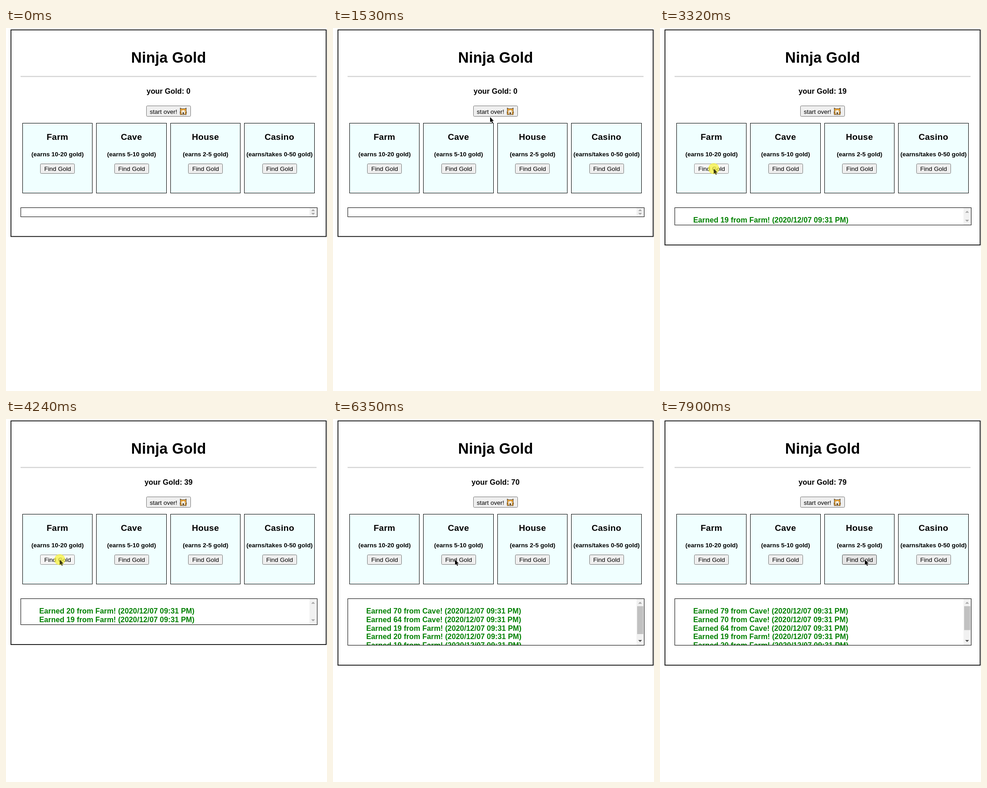
These frames come from a looping animation (705x795 px, 8000 ms). An HTML page:

```html
<!DOCTYPE html>
<html lang="en">
<head>
<meta charset="utf-8">
<title>Ninja Gold</title>
<style>
  html, body { margin: 0; width: 100%; height: 100%; overflow: hidden; background: #fff; }
  svg { display: block; width: 705px; height: 795px; font-family: "Liberation Sans", Arial, sans-serif; }
  text { white-space: pre; }
  .mid { text-anchor: middle; }
  .bold { font-weight: bold; }
  .title { font-size: 32.4px; letter-spacing: .28px; }
  .gold { font-size: 16.22px; letter-spacing: .08px; }
  .name { font-size: 19px; letter-spacing: .3px; }
  .note { font-size: 13.45px; }
  .label { font-size: 13.52px; letter-spacing: .03px; }
  .log { font-size: 16.22px; letter-spacing: .06px; fill: #008000; }
  .line { fill: none; stroke: #000; shape-rendering: crispEdges; }
  .card { fill: #f0ffff; stroke: #000; shape-rendering: crispEdges; }
  .btn { fill: #efefef; stroke: #767676; }
  .btn.hover { fill: #e5e5e5; stroke: #4f4f4f; }
  .btn.active { fill: #f5f5f5; stroke: #8d8d8d; }
</style>
</head>
<body>
<svg viewBox="0 0 705 795">
  <defs><clipPath id="clip"><rect id="clipBox" x="32" y="393" width="635" height="20"/></clipPath></defs>

  <rect id="frame" x="10.85" y="4.2" width="692.3" height="452" fill="none" stroke="#000" stroke-width="1.7"/>
  <text class="mid bold title" x="357.2" y="76.4">Ninja Gold</text>
  <rect x="32" y="105.5" width="650" height="1" fill="#a0a0a0"/>
  <rect x="32" y="106.5" width="650" height="1" fill="#e4e4e4"/>
  <text class="mid bold gold" id="total" x="357" y="144">your Gold: 0</text>

  <rect class="btn" x="308.5" y="170.5" width="97" height="23" rx="2"/>
  <text class="label" x="315.7" y="188">start over!</text>
  <g transform="translate(381 174)" stroke-linejoin="round">
    <path d="M2.2 7L1.6 1.2L5.6 3.2Q8.3 2.4 11 3.2L15 1.2L14.4 7Q16.4 11 14.4 14Q8.3 18 2.2 14Q.2 11 2.2 7Z" fill="#f7a932" stroke="#3a2a14"/>
    <path d="M8.3 5L12.6 9.6L12.8 14Q8.3 16.6 3.8 14L4 9.6Z" fill="#fff3df"/>
    <circle cx="5.4" cy="7.8" r="1.5" fill="#fff"/><circle cx="11.2" cy="7.8" r="1.5" fill="#fff"/>
    <circle cx="5.5" cy="7.9" r=".7" fill="#222"/><circle cx="11.1" cy="7.9" r=".7" fill="#222"/>
    <ellipse cx="8.3" cy="12.6" rx="1.7" ry="2.2" fill="#3a2a14"/>
    <path d="M1.2 11.5L4 11.2L4.4 16H1.8ZM15.4 11.5L12.6 11.2L12.2 16H14.8Z" fill="#f7a932" stroke="#3a2a14" stroke-width=".7"/>
  </g>

  <g id="cards"></g>

  <g clip-path="url(#clip)" id="lines"></g>
  <rect id="track" x="666.5" y="393" width="17" height="20" fill="#f1f1f1"/>
  <rect id="thumb" x="668" y="410" width="13.5" height="0" fill="#c1c1c1"/>
  <path id="up" d="M-4.2 2.1L0 -2.1L4.2 2.1Z" fill="#a3a3a3"/>
  <path id="down" d="M-4.2 -2.1L0 2.1L4.2 -2.1Z" fill="#a3a3a3"/>
  <rect id="logBox" class="line" x="32.4" y="393" width="651.1" height="20"/>

  <circle id="spot" r="12" fill="#f8f43a" fill-opacity=".72"/>
  <path id="cursor" d="M0 0V11.5L2.7 9.2L4.6 13.6L6.5 12.8L4.6 8.6H8.2Z" stroke="#fff" stroke-width=".8" paint-order="stroke"/>
</svg>
<script>
const LOOP = 8000, LINE = 18.65, LOG_TOP = 393, LOG_MAX = 495.6;
const $ = id => document.getElementById(id);
const set = (el, attrs) => { for (const k in attrs) el.setAttribute(k, attrs[k]); };

const places = [["Farm", "earns 10-20"], ["Cave", "earns 5-10"], ["House", "earns 2-5"], ["Casino", "earns/takes 0-50"]];
$("cards").innerHTML = places.map(([name, note], i) => {
  const x = 113 + 162.5 * i;
  return `<rect class="card" x="${x - 76.7}" y="208.4" width="153.6" height="153.2"/>
    <text class="mid bold name" x="${x}" y="244.8">${name}</text>
    <text class="mid bold note" x="${x + .3}" y="281">(${note} gold)</text>
    <rect class="btn" x="${Math.floor(x - 37.5) + .5}" y="297.5" width="75" height="21" rx="2"/>
    <text class="mid label" x="${x + .4}" y="313">Find Gold</text>`;
}).join("");
$("lines").innerHTML = [0, 1, 2, 3, 4, 5].map(i =>
  `<text class="bold log" x="72.9" y="${426.4 + LINE * i}"></text>`).join("");
const rows = [...$("lines").children];
const buttons = [...document.querySelectorAll(".btn")].map(el => ({
  el, x: +el.getAttribute("x"), y: +el.getAttribute("y"),
  w: +el.getAttribute("width"), h: +el.getAttribute("height")
}));

// press, release, page update, amount, place, total
const clicks = [
  [830, 970, 970],
  [1681, 1760, 1760],
  [2400, 2480, 2550, 19, "Farm", 19],
  [3320, 3400, 3480, 20, "Farm", 39],
  [4240, 4320, 4400, 19, "Farm", 58],
  [5320, 5400, 5500, 64, "Cave", 64],
  [6180, 6260, 6350, 70, "Cave", 70],
  [7120, 7200, 7290, 79, "Cave", 79]
];

// start, step length, steps, then [step, x, y] stops
const moves = [
  [110, 80, 10, [0, 652, 784], [3, 545, 420], [5, 430, 264], [7, 350, 420], [8, 333, 512], [9, 333, 512]],
  [970, 79, 11, [0, 333, 512], [3, 260, 410], [5, 300, 270], [7, 345, 195], [8, 346, 180], [10, 346, 180]],
  [1850, 76, 6, [0, 334, 187], [2, 240, 242], [4, 132, 303], [5, 118, 308]],
  [4630, 78.3, 7, [0, 122, 308], [2, 172, 306], [4, 238, 306], [6, 268, 308]],
  [7500, 80, 6, [0, 280, 308], [2, 358, 307], [4, 438, 308], [5, 450, 308]]
];

function pointer(t) {
  const move = moves.filter(m => t >= m[0]).pop();
  if (!move) return null;
  const [start, step, count, ...stops] = move;
  const k = Math.min(count - 1, Math.floor((t - start) / step));
  const i = Math.max(1, stops.findIndex(s => s[0] >= k));
  const a = stops[i - 1], b = stops[i], u = (k - a[0]) / (b[0] - a[0]);
  return { x: a[1] + (b[1] - a[1]) * u, y: a[2] + (b[2] - a[2]) * u, start };
}

function drawLog(t) {
  const done = clicks.filter(c => c[3] && t >= c[2]).reverse();
  const n = done.length;
  const bottom = Math.min(LOG_TOP + 20 + LINE * n, LOG_MAX);
  const height = bottom - LOG_TOP;
  rows.forEach((row, i) => {
    const c = done[i];
    row.textContent = c ? `Earned ${c[3]} from ${c[4]}! (2020/12/07 09:31 PM)` : "";
  });
  $("total").textContent = "your Gold: " + (n ? done[0][5] : 0);
  for (const id of ["logBox", "clipBox", "track"]) set($(id), { height });
  set($("frame"), { height: bottom + 43.6 - 4.2 });

  const inset = n ? 9.5 : 6;
  const scrolls = n > 4;
  set($("up"), { transform: `translate(674.5 ${LOG_TOP + inset})` });
  set($("down"), { transform: `translate(674.5 ${bottom - inset})`, fill: scrolls ? "#505050" : "#a3a3a3" });
  set($("thumb"), { height: scrolls ? 67.5 * 101.4 / (19 + LINE * n) : 0 });
}

function draw(t) {
  const p = pointer(t);
  const pressed = clicks.some(c => t >= c[0] && t < c[1]);
  // a reloaded page shows no hover until the pointer moves again
  const last = clicks.filter(c => c[3] && t >= c[2]).pop();
  const pressing = clicks.some(c => t >= c[0] && t < c[2]);
  const stale = p && last && last[2] > p.start && !pressing;

  for (const b of buttons) {
    const over = p && !stale && p.x >= b.x && p.x <= b.x + b.w && p.y >= b.y && p.y <= b.y + b.h;
    set(b.el, { class: "btn" + (over ? pressed ? " active" : " hover" : "") });
  }
  drawLog(t);

  set($("cursor"), { visibility: p ? "visible" : "hidden", fill: pressed ? "#3a3812" : "#000", "stroke-opacity": pressed ? 0 : 1 });
  set($("spot"), { visibility: pressed ? "visible" : "hidden" });
  if (p) {
    set($("cursor"), { transform: `translate(${p.x} ${p.y})` });
    set($("spot"), { cx: p.x, cy: p.y });
  }
}

function tick() {
  draw(performance.now() % LOOP);
  requestAnimationFrame(tick);
}
tick();
</script>
</body>
</html>
```
